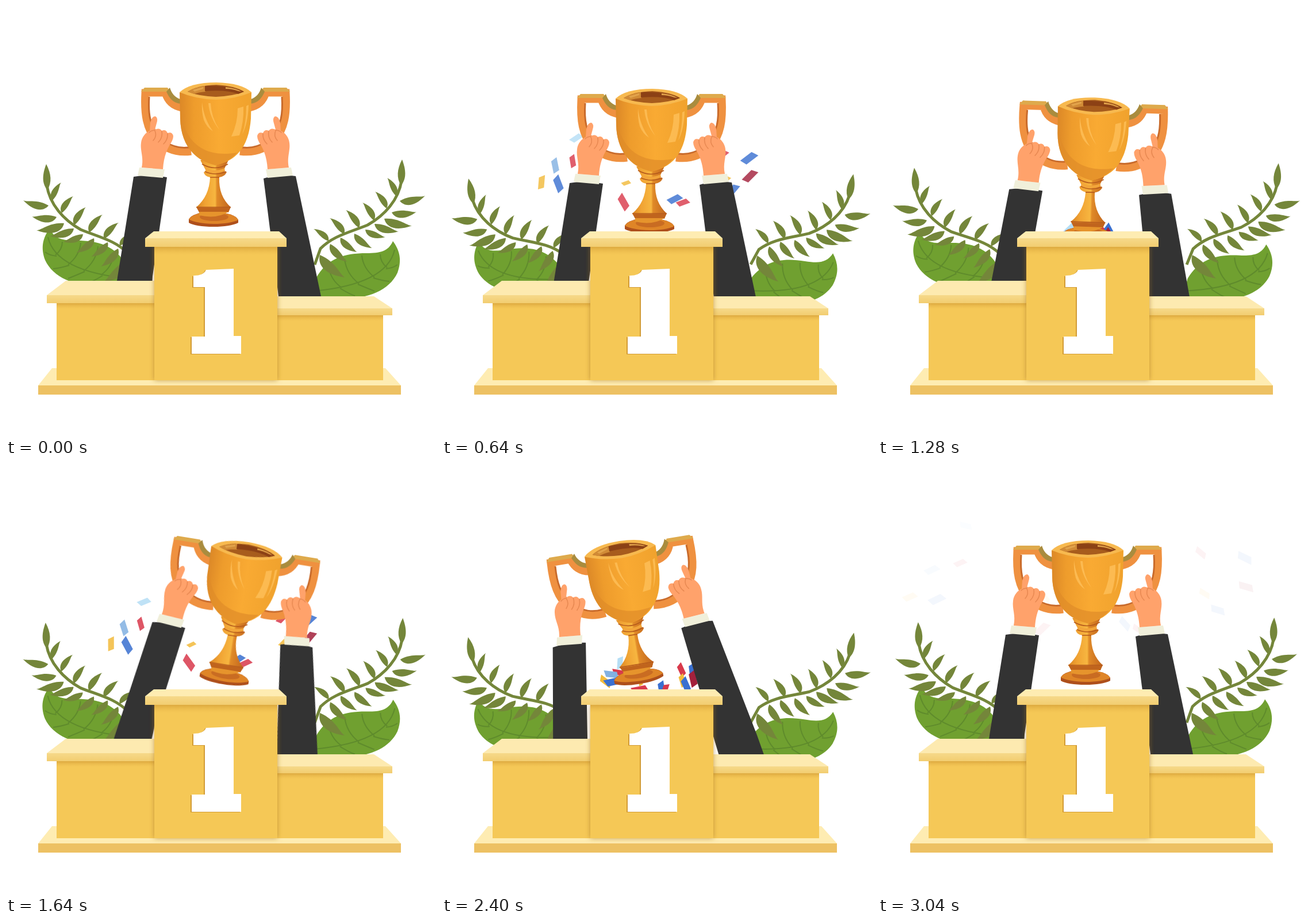
Write an HTML page that moves like this. It is 748x748 px and loops after 3080 ms.

```html
<!DOCTYPE html>
<html lang="en">
<head>
<meta charset="utf-8">
<title>Winner's podium</title>
<style>
html, body { margin: 0; width: 100%; height: 100%; overflow: hidden; background: #fff; }
svg { display: block; width: 100vw; height: 100vh; }
</style>
</head>
<body>
<svg viewBox="0 0 748 748">
  <defs>
    <linearGradient id="cup">
      <stop offset="0" stop-color="#dc8827"/><stop offset=".2" stop-color="#ee9c2c"/>
      <stop offset=".55" stop-color="#f9aa33"/><stop offset="1" stop-color="#f0a22d"/>
    </linearGradient>
    <linearGradient id="stem">
      <stop offset="0" stop-color="#d98422"/><stop offset=".25" stop-color="#f0a233"/>
      <stop offset=".55" stop-color="#f7b640"/><stop offset=".6" stop-color="#e08a28"/>
      <stop offset="1" stop-color="#c0641d"/>
    </linearGradient>
    <linearGradient id="lip" x2="0" y2="1">
      <stop offset="0" stop-color="#f6d98a"/><stop offset="1" stop-color="#f2cd70"/>
    </linearGradient>
    <linearGradient id="shade" x2="0" y2="1">
      <stop offset="0" stop-color="#c8902c" stop-opacity=".55"/><stop offset="1" stop-color="#e5b045" stop-opacity="0"/>
    </linearGradient>
    <filter id="glow" x="-10%" y="-10%" width="120%" height="120%">
      <feDropShadow dx="0" dy="0" stdDeviation="4" flood-color="#a87828" flood-opacity=".65"/>
    </filter>

    <path id="digit" d="M326 469Q344 469 348 459L396 457V574H409V605H323V575H346V489H326Z"/>
    <g id="bigleaf">
      <path fill="#70a030" d="M76 387C84 405 98 408 122 408C160 408 190 416 210 452L218 488H169C118 488 82 472 68 442C60 420 64 403 76 387Z"/>
      <g fill="none" stroke="#5f8b2c" stroke-width="2">
        <path d="M73 402C82 442 130 466 214 474"/>
        <path d="M86 433Q98 424 98 410M108 450Q128 434 130 412M135 461Q157 444 160 418M165 468Q185 454 188 430"/>
        <path d="M88 435Q76 434 68 428M110 451Q94 456 82 457M137 462Q118 470 108 474M168 469Q150 480 142 482"/>
      </g>
    </g>
    <g id="branch" fill="#74863a">
      <path fill="none" stroke="#74863a" stroke-width="5" d="M71 312C76 345 100 372 130 389C165 403 190 408 212 430L222 458"/>
    </g>
    <g id="handle">
      <path fill="none" stroke="#ef9140" stroke-width="13" d="M306 177C290 174 281 165 277 151H242C240 188 244 214 262 234C280 251 300 256 322 253"/>
      <path fill="none" stroke="#c96b2b" stroke-width="3" d="M249 158C247 188 250 208 268 228C284 244 300 248 318 246"/>
      <path fill="#deaa4c" d="M235 149L241 142H281L286 149Z"/>
      <path fill="#a98c3e" d="M279 149L285 142C288 152 294 159 303 162V170C290 168 284 160 279 149Z"/>
    </g>
    <g id="hand">
      <path fill="#f0efda" d="M232 281L276 284L273 299L229 295Z"/>
      <path fill="#ffa26b" d="M236 281C240 263 233 252 235 238C236 228 243 220 250 217L251 203Q254 191 260 192Q265 195 262 204L259 215Q267 211 271 217Q278 214 281 221Q289 218 291 226Q291 233 284 243C277 256 274 268 273 284Z"/>
      <path fill="none" stroke="#e88952" stroke-width="1.6" stroke-linecap="round" d="M249 220Q253 216 259 216M259 217Q263 226 256 234M271 218Q273 229 265 237M281 222Q282 232 274 240"/>
    </g>
  </defs>

  <g id="leafL"><use href="#bigleaf"/></g>
  <g id="leafR"><use href="#bigleaf" transform="matrix(-1 0 0 1 749 22)"/></g>
  <g id="branchL"><use href="#branch"/></g>
  <g id="branchR"><use href="#branch" transform="matrix(-1 0 0 1 759 -8)"/></g>
  <g id="confetti"></g>

  <g id="lift">
    <path fill="#333" d="M222 297Q250 292 280 298L255 470L250 560H180L193 478Z"/>
    <path fill="#333" d="M448 300Q476 291 504 296L548 505L558 560H481L474 505Z"/>
    <use href="#handle"/>
    <use href="#handle" transform="matrix(-1 0 0 1 729 0)"/>
    <g>
      <path fill="url(#stem)" d="M338 268H387L380 283Q378 288 384 289Q380 297 371 298C370 320 377 337 391 350L387 358H336L331 350C346 337 354 320 355 298Q345 296 344 289Q349 287 346 283Z"/>
      <path fill="none" stroke="#b55a1c" stroke-width="1.6" d="M341 275Q364 288 386 275M346 288Q364 296 383 288M355 298H371M331 350H391"/>
      <path fill="#f2a53a" d="M347 282Q362 290 380 282L381 287Q364 294 347 287Z"/>
      <path fill="#c0641d" d="M332 351H390L387 359H336Z"/>
      <path fill="#ae4f1b" d="M318 371Q324 359 361 358Q398 360 404 372V377Q390 384 361 384Q330 384 318 377Z"/>
      <path fill="#df8527" d="M318 371Q326 359 361 358Q397 360 404 372Q390 379 361 379Q330 378 318 371Z"/>
      <ellipse cx="362" cy="367" rx="25" ry="7" fill="#c96c22"/>
      <path fill="#e6942c" d="M336 358H387Q366 371 336 364Z"/>
    </g>
    <path fill="url(#cup)" d="M302 150Q364 166 427 150L426 196C423 236 408 268 364 277C325 268 304 238 303 196Z"/>
    <path fill="#e08c28" opacity=".7" d="M303 178C308 232 340 266 402 255Q388 272 364 277C325 268 304 238 303 196Z"/>
    <path fill="#ffc25c" opacity=".75" d="M341 167Q344 196 360 218Q349 211 344 198Q340 184 341 167ZM352 169H356Q357 193 371 215Q354 194 352 169ZM403 178L413 175Q414 202 406 225L392 227Q403 204 403 178ZM418 174L422 172Q421 204 411 223Q418 202 418 174Z"/>
    <path fill="#f7b94f" d="M302 150Q320 133 366 133Q410 134 427 150Q398 162 365 163Q330 162 302 150Z"/>
    <path fill="#a75c1d" d="M316 149Q333 138 366 137Q399 139 414 149Q394 157 365 158Q336 157 316 149Z"/>
    <path fill="#d18b36" d="M316 149Q327 142 346 139L347 149Q335 150 327 153Z"/>
    <path fill="#8c4115" d="M346 139Q390 137 414 149L404 153Q384 145 346 148Z"/>
    <path fill="#e2a34b" d="M325 146L343 141V144L328 149ZM382 141Q401 143 410 149L404 148Q393 144 382 144Z"/>
    <use href="#hand"/>
    <use href="#hand" transform="matrix(-1 0 0 1 728 0)"/>
  </g>

  <path fill="#feecb2" d="M80 630H660L687 660H56Z"/>
  <path fill="#edc163" d="M56 660H687V676H56Z"/>
  <path fill="#f5c857" d="M88 516H260V651H88ZM470 537H656V651H470Z"/>
  <path fill="url(#shade)" d="M88 517H260V527H88Z"/>
  <path fill="url(#shade)" d="M470 538H656V548H470Z"/>
  <path fill="#fdeab0" d="M104 478H260V503H71ZM470 505H640L672 526H470Z"/>
  <path fill="url(#lip)" d="M71 503H260V517H71Z"/>
  <path fill="url(#lip)" d="M470 526H672V538H470Z"/>
  <path fill="#f5c857" filter="url(#glow)" d="M258 418H472V651H258Z"/>
  <path fill="url(#shade)" d="M258 419H472V433H258Z"/>
  <path fill="#feecb2" d="M257 392H475L488 404H242Z"/>
  <path fill="url(#lip)" d="M242 404H488V419H242Z"/>
  <use href="#digit" fill="#d29b35" x="-2" y="1"/>
  <use href="#digit" fill="#fff"/>
</svg>
<script>
const $ = id => document.getElementById(id);
const add = (parent, attrs) => {
  const el = document.createElementNS('http://www.w3.org/2000/svg', 'path');
  for (const k in attrs) el.setAttribute(k, attrs[k]);
  return parent.appendChild(el);
};

// Slim curved leaf from its base on the stem to its tip
function blade(bx, by, tx, ty, bend) {
  const dx = tx - bx, dy = ty - by;
  const at = (u, v) => `${bx + u * dx - v * bend * dy} ${by + u * dy + v * bend * dx}`;
  add($('branch'), { d: `M${at(0, 0)}C${at(.15, .3)} ${at(.55, .32)} ${at(1, 0)}C${at(.85, .06)} ${at(.5, -.17)} ${at(0, 0)}Z` });
}
add($('branch'), { d: 'M70 275C79 292 80 307 72 320C62 309 63 293 70 275Z' });
[[81, 338, 96, 307], [97, 360, 117, 331], [119, 381, 139, 350], [145, 394, 168, 363],
 [171, 405, 196, 377], [198, 417, 224, 396]].forEach(p => blade(...p, -1));
[[74, 347, 30, 338], [88, 367, 45, 366], [101, 378, 53, 390], [118, 387, 76, 400],
 [134, 397, 99, 410], [153, 404, 122, 429], [177, 411, 148, 436], [195, 422, 165, 453],
 [213, 441, 169, 480]].forEach(p => blade(...p, -1));

// Confetti: far point, colour, angle on the way, turn, size
const SKY = '#b5def5', AZURE = '#82b1e2', BLUE = '#3a70d0', RED = '#d93a4c', WINE = '#a3213c', GOLD = '#f2bb3c';
const pieces = [
  [171, 135, SKY, -25, -110, 1], [162, 194, RED, 80, 62, 1], [117, 205, AZURE, 78, 62, 1.15],
  [82, 248, GOLD, 95, 50, 1.1], [125, 252, BLUE, 68, 70, 1.3], [299, 250, GOLD, -20, 60, .7],
  [292, 299, RED, 60, 62, 1.3], [545, 178, RED, 140, 65, 1.05], [615, 186, BLUE, 143, 52, 1.3],
  [617, 232, WINE, 135, 50, 1.25], [551, 243, GOLD, 140, 58, 1], [572, 269, BLUE, 130, 55, 1.2],
  [424, 291, BLUE, 152, 62, 1.15], [445, 300, RED, 160, 45, 1]
].map(p => [add($('confetti'), { d: 'M-12 -4L8 -5L12 4L-7 5Z', fill: p[2] }), ...p]);

const LOOP = 3080, BURST = LOOP / 3, SWAY = LOOP / 2;
const heights = [[0, 0], [385, 34], [800, 0], [1160, 33], [1580, -4], [1990, 33], [2400, -3], [3040, 0], [LOOP, 0]];
const tilts = [[0, 0], [1130, 0], [1640, 9.2], [2480, -9.7], [2760, 0], [LOOP, 0]];
// Plant part, sway direction, pivot
const plants = [['leafL', -1, 218, 478], ['leafR', 1, 540, 465], ['branchL', -1, 220, 440], ['branchR', 1, 540, 450]];

function ease(keys, t) {
  const i = keys.findIndex(k => k[0] > t);
  const [t0, a] = keys[i - 1], [t1, b] = keys[i];
  return a + (b - a) * (1 - Math.cos(Math.PI * (t - t0) / (t1 - t0))) / 2;
}

function draw(t) {
  const sway = 4.8 * (1 - Math.cos(2 * Math.PI * t / SWAY));
  for (const [id, side, x, y] of plants)
    $(id).setAttribute('transform', `rotate(${side * sway} ${x} ${y})`);
  $('lift').setAttribute('transform', `translate(0 ${ease(heights, t)}) rotate(${ease(tilts, t)} 362 490)`);

  const age = t % BURST, u = Math.max(0, (age - 150) / 870);
  const f = 1.3 * u - .17 * u * u;
  const fade = Math.max(0, (age - 500) / 510);
  $('confetti').setAttribute('opacity', u ? Math.max(0, 1 - fade ** 1.3) : 0);
  for (const [el, x, y, , angle, turn, size] of pieces)
    el.setAttribute('transform', `translate(${365 + (x - 365) * f} ${430 + (y - 430) * f}) rotate(${angle + turn * (f - .66) / .34}) scale(${size})`);
}

const start = performance.now();
(function tick() {
  draw(Math.floor((performance.now() - start) % LOOP / 40) * 40);
  requestAnimationFrame(tick);
})();
</script>
</body>
</html>
```
